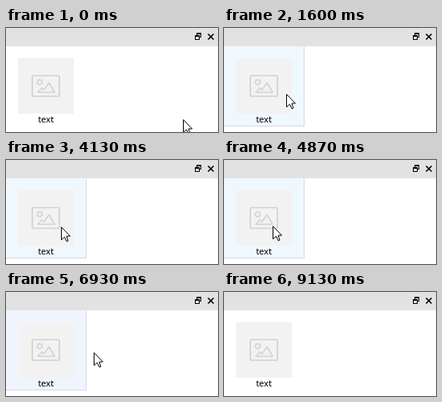
Recreate the animation shown at these times as an HTML page with a canvas. Size 266 by 131 pixels, loop 9590 ms.

```html
<!DOCTYPE html>
<html lang="en">
<head>
<meta charset="utf-8">
<title>Thumbnail item hover and selection</title>
<style>
  html, body { margin: 0; width: 100%; height: 100%; overflow: hidden; background: #fff; }
  canvas { display: block; }
</style>
</head>
<body>
<canvas id="stage" width="266" height="131"></canvas>
<script>
const ctx = document.getElementById('stage').getContext('2d');
const LOOP = 9590;
const FPS = 15;
const ITEM = { x: 0, y: 23, size: 101 };
const HOVER = '#f0f8ff';
const SELECTED = '#f0f4ff';

// The hand drifts upwards for a while late in the loop.
const drift = tick => -11 * Math.exp(-(((tick - 94) / 13) ** 2));
const home = tick => ({ tick, x: 61, y: 84 + drift(tick) });
const away = (tick, x) => ({ tick, x, y: 80 + drift(tick) });

// A trip leaves the item, waits beside it at x and comes back.
const trip = (leave, arrive, turn, back, x) =>
  [home(leave), away(arrive, x), away(turn, x), home(back)];

const path = [
  { tick: 0, x: 222, y: 115 }, home(5),
  ...trip(9, 14, 15, 20, 152),
  ...trip(22, 29, 29, 34, 145),
  ...trip(39, 46, 51, 57, 157),
  ...trip(61, 67, 70, 73, 165),
  ...trip(75, 80, 80, 85, 178),
  ...trip(88, 96, 102, 106, 158),
  home(111),
  { tick: 116, x: 124, y: 90 }, { tick: 120, x: 113, y: 103 },
  { tick: 126, x: 120, y: 113 }, { tick: 137, x: 60, y: 135 }
];

function pointerAt(tick) {
  const next = path.findIndex(pose => pose.tick > tick);
  if (next < 0) return path[path.length - 1];
  const a = path[next - 1], b = path[next];
  const u = (tick - a.tick) / (b.tick - a.tick);
  const eased = u * u * (3 - 2 * u);
  const mix = axis => Math.round(a[axis] + (b[axis] - a[axis]) * eased);
  return { x: mix('x'), y: mix('y') };
}

function rect(color, x, y, w, h) {
  ctx.fillStyle = color;
  ctx.fillRect(x, y, w, h);
}

function polygon(points) {
  ctx.beginPath();
  points.forEach(([x, y]) => ctx.lineTo(x, y));
  ctx.closePath();
}

function drawTitleBar() {
  const bar = '#e2e2e2';
  rect(bar, 0, 0, 266, 23);
  for (const [x, y] of [[239, 6], [237, 9]]) {
    rect('#000', x, y, 6, 6);
    rect(bar, x + 1, y + 2, 4, 3);
  }
  ctx.strokeStyle = '#000';
  ctx.lineWidth = 1.6;
  ctx.beginPath();
  ctx.moveTo(253.5, 7.5);
  ctx.lineTo(260.5, 14.5);
  ctx.moveTo(260.5, 7.5);
  ctx.lineTo(253.5, 14.5);
  ctx.stroke();
}

function drawItem(fill) {
  if (fill) {
    rect('#d0d8e8', ITEM.x, ITEM.y, ITEM.size, ITEM.size);
    rect(fill, ITEM.x, ITEM.y, ITEM.size - 1, ITEM.size - 1);
  }
  rect('#f2f2f2', 15, 38, 70, 70);
  ctx.strokeStyle = '#d2d2d2';
  ctx.lineJoin = 'round';
  ctx.lineWidth = 1.7;
  ctx.beginPath();
  ctx.roundRect(33, 60, 34, 26, 2);
  ctx.stroke();
  ctx.lineWidth = 1.5;
  ctx.beginPath();
  ctx.arc(42.3, 68.3, 3, 0, Math.PI * 2);
  ctx.stroke();
  polygon([[40, 81], [45, 75.5], [47.5, 78], [54, 69], [61, 81]]);
  ctx.stroke();

  ctx.fillStyle = '#000';
  ctx.font = '11px "Noto Sans", "Open Sans", sans-serif';
  ctx.textAlign = 'center';
  ctx.fillText('text', 50, 119);
}

function drawPointer({ x, y }) {
  ctx.save();
  ctx.translate(x + 0.5, y + 0.5);
  polygon([[0, 0], [0, 16], [4, 12.5], [6.5, 18], [8.5, 17.5], [6.5, 11.5], [11, 11.5]]);
  ctx.fillStyle = '#fff';
  ctx.fill();
  ctx.strokeStyle = '#000';
  ctx.lineJoin = 'round';
  ctx.lineWidth = 1;
  ctx.stroke();
  ctx.restore();
}

function itemFill(tick, tip) {
  if (tick >= 85 && tick < 112) return SELECTED;
  const held = tick >= 34 && tick < 62;
  const hovered = tip.x < ITEM.x + ITEM.size && tip.y < ITEM.y + ITEM.size;
  return held || hovered ? HOVER : null;
}

function render(time) {
  const tick = Math.floor((time % LOOP + 4) * FPS / 1000);
  const tip = pointerAt(tick);
  rect('#fff', 0, 0, 266, 131);
  drawTitleBar();
  drawItem(itemFill(tick, tip));
  drawPointer(tip);
}

const start = performance.now();
function loop() {
  render(performance.now() - start);
  requestAnimationFrame(loop);
}
loop();
</script>
</body>
</html>
```
